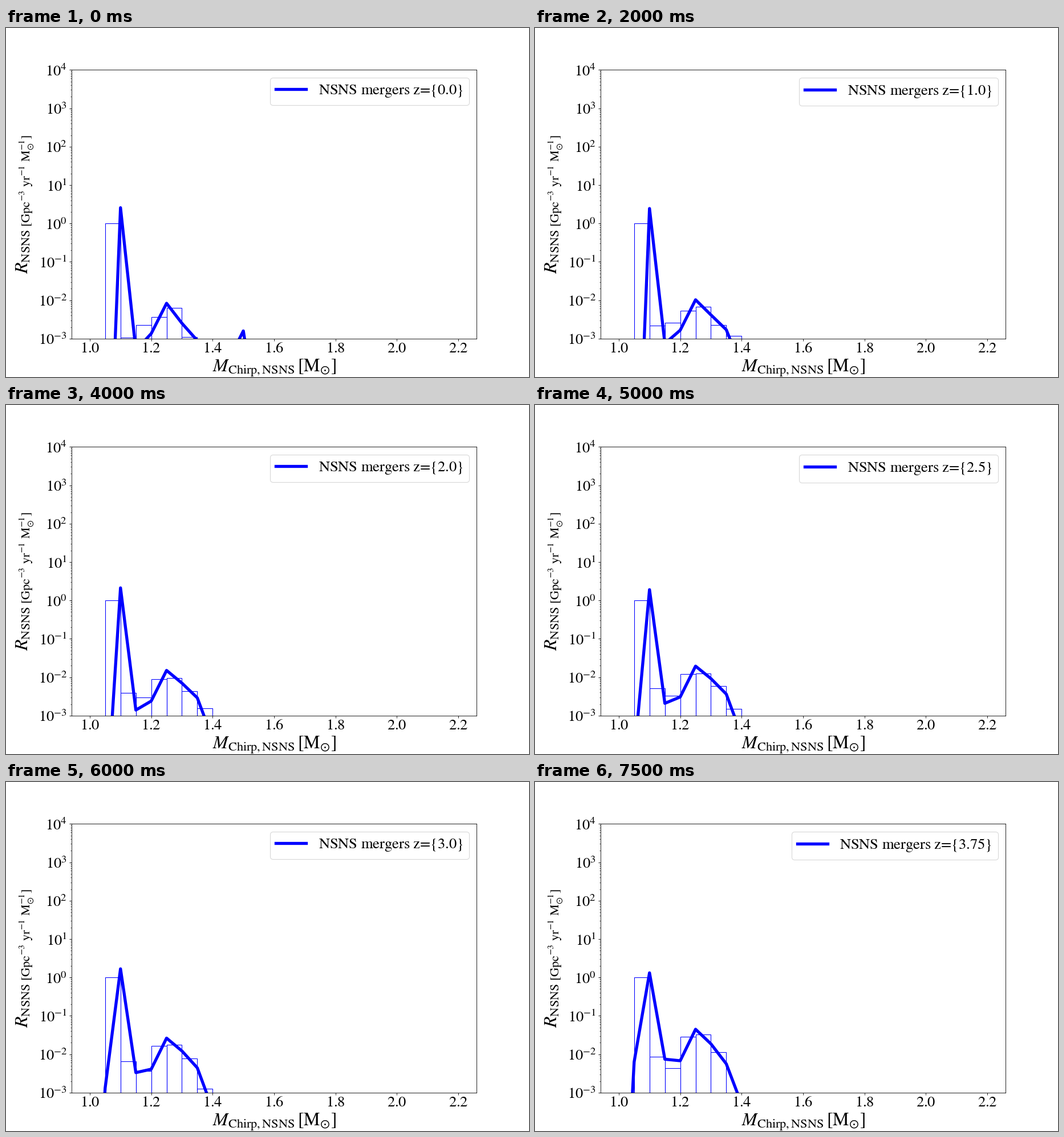
Recreate the animation shown at these times as a matplotlib script. Size 917 by 611 pixels, loop 8000 ms.

```python
import numpy as np
import matplotlib.pyplot as plt
from matplotlib.animation import FuncAnimation

W, H = 917, 611
DPI = W / 12
STEPS = 16
BIN = 0.05
FLOOR = -9.5

plt.rcParams.update({
    "font.family": "Liberation Serif",
    "mathtext.fontset": "stix",
    "font.size": 25,
})

# log10 rate per bin: a + b*u + c*u**2, with u running from 0 to 1
CURVE = [
    (FLOOR, 0, 0),
    (-19.2, 34, -17),
    (0.41, 0, -0.29),
    (-3.3, 0.45, 0.72),
    (-2.87, 0.2, 0.5),
    (-2.08, 0.2, 0.53),
    (-2.6, 0.8, 0.07),
    (-3.05, 1.15, -0.35),
    (-3.9, 0.5, 0.1),
    (-3.6, -16, 0),
    (-2.8, -16, 0),
    (-5.3, -16, 0),
]
BARS = [
    (0, 0, 0),
    (-2.98, 1.27, -0.35),
    (-2.65, 0.2, 0.08),
    (-2.44, 0.55, 0.34),
    (-2.2, -0.1, 0.82),
    (-2.96, 1.25, -0.24),
    (-3.29, 1.76, -1.6),
]


def rates(terms, step):
    u = step / (STEPS - 1)
    return 10 ** np.maximum(np.array(terms) @ [1, u, u * u], FLOOR)


def bins(start, terms):
    return start + BIN * np.arange(len(terms))


def label(step):
    # Negative spaces cancel the relation spacing around "="
    equals = r"\hspace{-0.2}=\hspace{-0.2}"
    return rf"$\mathrm{{NSNS\ mergers\ z{equals}\{{{0.25 * step}\}}}}$"


def power_label(value, pos):
    return rf"$\mathrm{{10^{{{round(np.log10(value))}}}}}$"


# The tiny margin keeps rounding from losing a pixel
fig = plt.figure(figsize=((W + 1e-6) / DPI, (H + 1e-6) / DPI), dpi=DPI)
ax = fig.add_subplot()
ax.set_yscale("log")
ax.set_xlabel(r"$M_{\rm Chirp, NSNS}\,\rm [M_{\odot}]$", fontsize=30)
ax.set_ylabel(r"$R_{\rm NSNS\ [Gpc^{-3}\ yr^{-1}\ M_{\odot}^{-1}]}$", fontsize=30)

bottom = 10 ** FLOOR
bars = ax.bar(bins(1.05, BARS), rates(BARS, 0), width=BIN, bottom=bottom,
              align="edge", fill=False, edgecolor="blue", linewidth=1)
line, = ax.plot(bins(1.0, CURVE), rates(CURVE, 0), color="blue", lw=5,
                label=label(0))
caption = ax.legend(loc="upper right").get_texts()[0]

ax.set_xlim(0.94, 2.26)
ax.set_ylim(1e-3, 1e4)
ax.xaxis.set_major_formatter(r"$\mathrm{{{x:.1f}}}$")
ax.yaxis.set_major_formatter(power_label)


def update(step):
    line.set_ydata(rates(CURVE, step))
    for bar, rate in zip(bars, rates(BARS, step)):
        bar.set_height(rate - bottom)
    caption.set_text(label(step))
    return [line, caption, *bars]


anim = FuncAnimation(fig, update, frames=STEPS, interval=500,
                     repeat=True, repeat_delay=0, blit=False)
plt.show()
```
